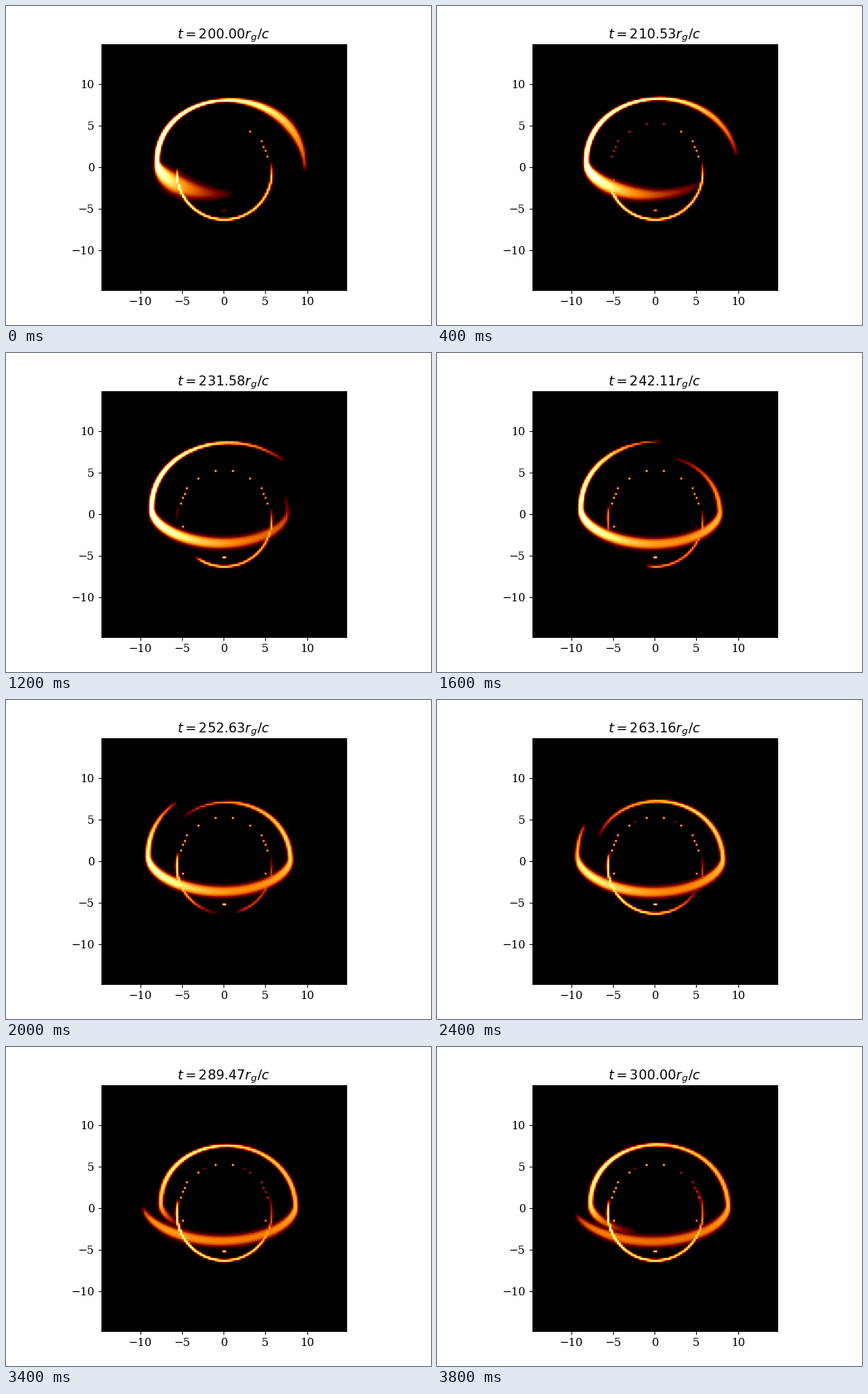
These frames come from a looping animation (512 px wide and 384 px high, 4000 ms). A matplotlib script:

```python
import numpy as np
import matplotlib.pyplot as plt
from matplotlib.animation import FuncAnimation

plt.rcParams["font.family"] = "DejaVu Serif"
plt.rcParams["font.size"] = 12
plt.rcParams["mathtext.fontset"] = "dejavusans"

FRAMES, INTERVAL = 20, 200
T0, T1 = 200.0, 300.0
N, HALF = 128, 147.84                # grid cells, half width (10 per r_g)
HALF_RG = 14.76

axis = (np.arange(N) + 0.5) * 2 * HALF / N - HALF

# Angles (degrees) of the trailing and leading ends of the arc over time
KEYS = [200, 221.05, 231.58, 252.63, 263.16, 278.95, 300]
TAIL = [-8, 23, 44, 127, 152, 176, 198]
LEAD = [276, 355, 374, 492, 518, 562, 612]

# Secondary image: an old arc leaving and a new one arriving
OLD_START = [176, 213, 233, 285, 335, 372, 372]
NEW_END = [160, 165, 182, 262, 342, 372, 395]

# Unresolved spots of the photon ring, mirrored left and right
SPOTS = [(9.5, 52), (31.5, 43), (44, 31.5), (47, 25), (50, 19.5), (52, 13.5)]


def at(t, values):
    return np.interp(t, KEYS, values)


def stamp(x, y, sx, sy, level):
    """Brightest of many small flat-topped blobs at every grid cell."""
    gx = np.exp(-0.5 * np.abs((axis - x[:, None]) / sx[:, None]) ** 3)
    gy = np.exp(-0.5 * np.abs((axis - y[:, None]) / sy[:, None]) ** 3)
    gx, gy = gx.astype("f4"), (gy * level[:, None]).astype("f4")
    return (gy[:, :, None] * gx[:, None, :]).max(axis=0)


def ramp(d, width, power):
    return np.clip(d / width, 0, 1) ** power


def primary(t):
    """Hot spot sheared into a spiral by Keplerian rotation, seen inclined."""
    tail, lead = at(t, TAIL), at(t, LEAD)
    deg = np.arange(tail, lead, 1.0)
    c, s = np.cos(np.radians(deg)), np.sin(np.radians(deg))
    r = 168 * ((t + 55) / (deg + 585)) ** (2 / 3)
    x = r * c
    y = s * np.where(s > 0, 0.75 * r + 14.6, 0.43 * r) + 4 * (1 - s ** 2)

    beaming = 0.87 - 0.16 * c - 0.3 * np.clip(-s, 0, 1) ** 1.5
    ends = ramp(deg - tail, 90, 0.3) * ramp(lead - deg, 110, 0.45)
    level = (1.08 - 0.002 * (t - T0)) * beaming * ends

    # The trailing end starts broad and is soon drawn out thin
    swell = 1 + 2 * np.clip(c * s, 0, 1) * np.exp((T0 - t) / 10)
    taper = 0.6 + 0.4 * ramp(deg - tail, 40, 1) * ramp(lead - deg, 60, 1)
    w = (1 - s) / 2
    return stamp(x, y, (1.6 + 2.0 * w) * taper * swell,
                 (1.6 + 4.0 * w) * taper * swell, level)


def ring_arc(start, end, fade_in, fade_out, level):
    if end - start < 2:
        return np.zeros((N, N))
    deg = np.arange(start, end, 1.0)
    a = np.radians(deg)
    fade = ramp(deg - start, fade_in, 0.5) * ramp(end - deg, fade_out, 0.6)
    width = np.full(deg.shape, 1.3)
    shade = level * (1 - 0.1 * np.cos(a))
    return stamp(57.2 * np.cos(a), -5.8 + 57.2 * np.sin(a),
                 width, width, shade * fade)


def secondary(t):
    old = ring_arc(at(t, OLD_START), 372, 10, 18,
                   at(t, [.84, .8, .72, .45, .45, .45, .45]))
    new = ring_arc(164, at(t, NEW_END), 12, 70,
                   at(t, [.6, .6, .6, .78, .78, .82, .84]))
    return np.maximum(old, new)


def light(img, x, y, level):
    i, j = (int((v + HALF) * N / (2 * HALF)) for v in (y, x))
    img[i, j] = max(img[i, j], level)


def photon_ring(img, t):
    left = 0.75 * np.clip((t - 204) / 12, 0, 1)
    right = 0.7 - 0.3 * np.clip((t - 265) / 25, 0, 1)
    for x, y in SPOTS:
        top = x < 20
        light(img, -x, y, left)
        light(img, x, y, left if top else right)
    if t > 257:
        light(img, -24, 47.5, 0.3)
        light(img, 24, 47.5, 0.3 * (t < 292))
    light(img, -50, -15, left)
    light(img, 50, -15, 0.65 * np.clip((t - 240) / 10, 0, 1))
    for x in (-1.2, 1.2):
        light(img, x, -52, 0.25 + 0.7 * left)


def render(t):
    img = np.maximum(primary(t), secondary(t))
    photon_ring(img, t)
    return img


times = np.linspace(T0, T1, FRAMES)
images = [render(t) for t in times]

fig, ax = plt.subplots(figsize=(6.4, 4.8), dpi=80)
picture = ax.imshow(images[0], cmap="afmhot", vmin=0, vmax=1, origin="lower",
                    extent=(-HALF_RG, HALF_RG, -HALF_RG, HALF_RG))
ax.set_xticks([-10, -5, 0, 5, 10])
ax.set_yticks([-10, -5, 0, 5, 10])
title = ax.set_title("")


def update(i):
    picture.set_data(images[i])
    title.set_text(f"$t = {times[i]:.2f} r_g/c$")
    return picture, title


anim = FuncAnimation(fig, update, frames=FRAMES, interval=INTERVAL,
                     repeat=True, repeat_delay=0, blit=False)
plt.show()
```
